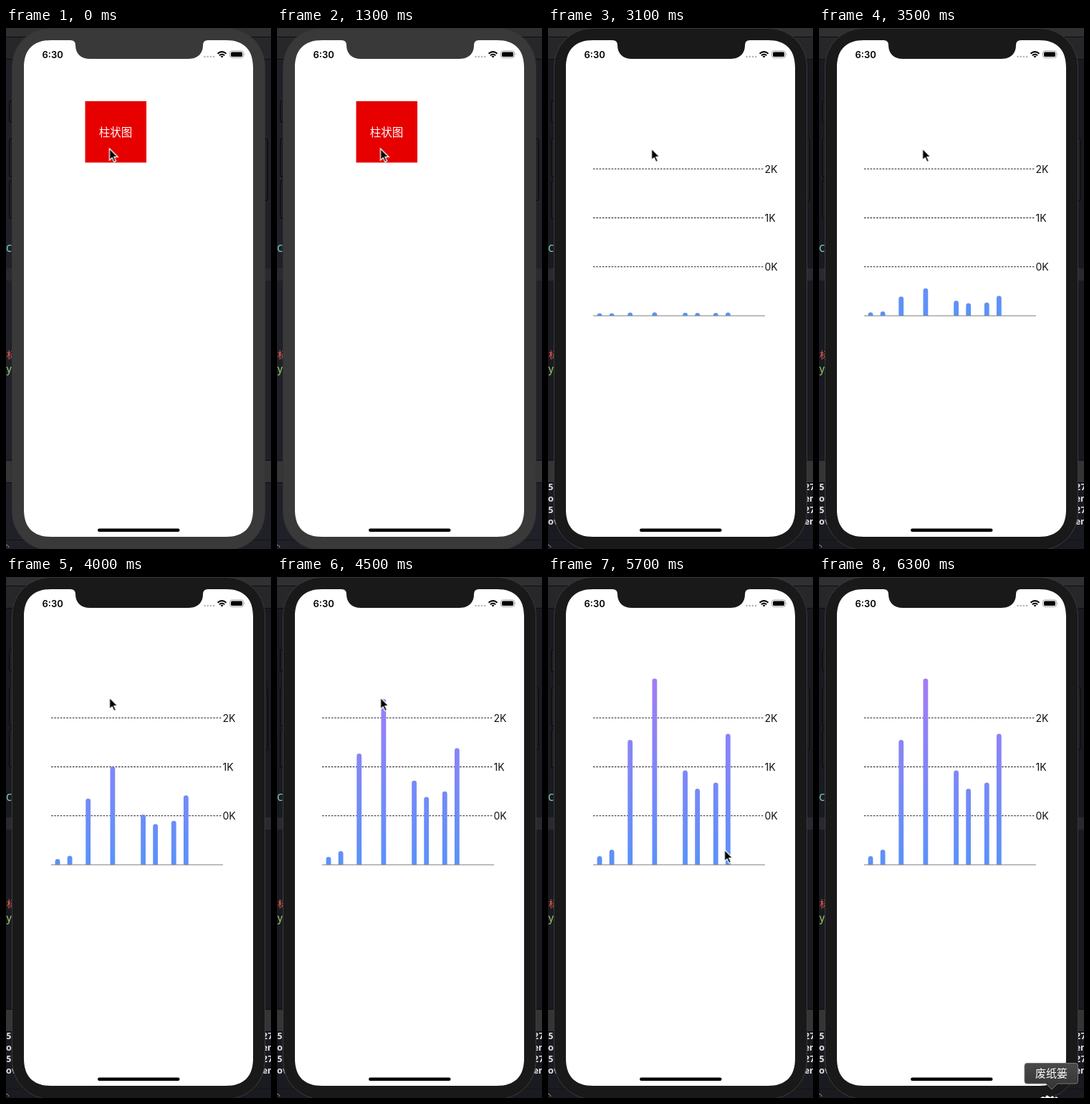
An HTML page that plays this animation: 370 by 726 pixels, repeating every 6.9 s.

```html
<!DOCTYPE html>
<html lang="zh">
<head>
<meta charset="utf-8">
<title>柱状图</title>
<style>
html, body { margin: 0; width: 100%; height: 100%; overflow: hidden; background: #1b1c22; }
svg { display: block; width: 370px; height: 726px; }
.ui { font-family: Inter, Roboto, sans-serif; }
.cjk { font-family: "Noto Sans CJK SC", "Noto Sans CJK", sans-serif; fill: #fff; }
.code { font: 14px "Noto Sans Mono", "DejaVu Sans Mono", monospace; }
.log { font: bold 13px "Noto Sans Mono", "DejaVu Sans Mono", monospace; fill: #e2e2e4; }
.label { font-size: 14px; fill: #111; }

/* one loop: press at 2900, chart at 3000, pointer leaves at 5400 */
.press, .menu, .chart, .ring, .editor, .body { animation: 6900ms step-end infinite; }
.editor { animation-name: editor; }
.body { animation-name: body; }
.ring { animation-name: ring; }
.menu { animation-name: menu; }
.chart { animation-name: chart; }
.bar { animation: grow 6900ms linear infinite; }
.pointer { animation: pointer 6900ms linear infinite; }
.tip { animation: tip 6900ms linear infinite; }

@keyframes editor { 0% { fill: #202128; } 42.02%, 100% { fill: #1a1b21; } }
@keyframes body {
  0% { fill: #393939; stroke: #343434; }
  42.02%, 100% { fill: #191919; stroke: #3b3b3b; }
}
@keyframes ring { 0% { opacity: 0; } 42.02% { opacity: 1; } 43.47%, 100% { opacity: 0; } }
@keyframes menu { 0% { opacity: 1; } 43.47%, 100% { opacity: 0; } }
@keyframes chart { 0% { opacity: 0; } 43.47%, 100% { opacity: 1; } }
@keyframes grow {
  0%, 43.47% { y: 397.5px; animation-timing-function: cubic-bezier(.42, 0, .58, 1); }
  71.83%, 100% { y: var(--top); }
}
@keyframes pointer {
  0%, 78.26% { transform: translate(144.5px, 168px); animation-timing-function: ease-in; }
  82.609% { transform: translate(246px, 378px); animation-timing-function: ease-out; }
  86.957%, 100% { transform: translate(322px, 732px); }
}
@keyframes tip {
  0%, 86.95% { opacity: 0; transform: translateY(30px); }
  86.957% { opacity: 1; transform: translateY(30px); animation-timing-function: ease-out; }
  90.5%, 100% { opacity: 1; transform: none; }
}
</style>
</head>
<body>
<svg viewBox="0 0 370 726">
  <defs>
    <linearGradient id="tint" gradientUnits="userSpaceOnUse" x1="0" y1="401" x2="0" y2="141">
      <stop offset="0" stop-color="#5a92f8"/>
      <stop offset="1" stop-color="#a47cf6"/>
    </linearGradient>
    <linearGradient id="panel" x2="0" y2="1">
      <stop offset="0" stop-color="#4a4a4a"/>
      <stop offset="1" stop-color="#333"/>
    </linearGradient>
    <clipPath id="plot"><rect x="60" y="100" width="250" height="301"/></clipPath>
  </defs>

  <!-- editor behind the phone -->
  <rect class="editor" width="370" height="726"/>
  <rect width="370" height="12" fill="#303032"/>
  <rect y="13" width="370" height="30" fill="#27272a"/>
  <path d="M0 12.5H370M0 43.5H370M0 602.5H370M0 633.5H370" stroke="#0e0e10"/>
  <rect y="335" width="370" height="17" fill="#292a31"/>
  <rect y="603" width="370" height="30" fill="#353537"/>
  <path d="M0 713.5H370" stroke="#131317"/>
  <path d="M-2 722Q2 718 4 724" fill="none" stroke="#999"/>
  <g class="code">
    <text x="0" y="312" fill="#83d6c5">C</text>
    <text x="1" y="460" fill="#ef5b55" style="font-family:'Noto Sans CJK SC','Noto Sans CJK',sans-serif;font-size:13px">标</text>
    <text x="0" y="480" fill="#a9dc76">y</text>
  </g>
  <g class="chart log" id="logs"></g>

  <!-- phone -->
  <g fill="#1d1d1f" stroke="#08080a">
    <rect x="4.5" y="101.5" width="8" height="30" rx="2"/>
    <rect x="4.5" y="154.5" width="8" height="53" rx="2"/>
    <rect x="4.5" y="212.5" width="8" height="53" rx="2"/>
    <rect x="357.5" y="154.5" width="8" height="86" rx="2"/>
  </g>
  <rect class="body" x="8.5" y=".5" width="353" height="727" rx="53"/>
  <path fill="#fff" d="M63 17H90Q97 17 97 24C97 36 105 43 117 43H255C267 43 275 36 275 24Q275 17 282 17H307C332 17 345 30 345 55V671C345 696 332 709 307 709H63C38 709 25 696 25 671V55C25 30 38 17 63 17Z"/>
  <rect x="128" y="697.5" width="114.500" height="4.500" rx="2.250"/>

  <g class="ui">
    <text x="50.500" y="41.500" font-size="13" font-weight="600">6:30</text>
    <path d="M277.500 40H292" stroke="#b5b5b5" stroke-width="2.600" stroke-linecap="round" stroke-dasharray="0 4.200"/>
    <g fill="none" stroke="#000" stroke-width="2">
      <path d="M295.500 35.700Q301.500 30.500 307.500 35.700M297.800 38.300Q301.500 35.200 305.200 38.300"/>
      <path d="M301.500 41.500L299.500 39.500Q301.500 38 303.500 39.500Z" fill="#000" stroke="none"/>
    </g>
    <rect x="312.500" y="32" width="19" height="9.500" rx="2.800" fill="none" stroke="#a2a2a2"/>
    <rect x="314" y="33.500" width="16" height="6.500" rx="1.500"/>
    <path d="M332.700 35Q334.500 36.700 332.700 38.500Z" fill="#a2a2a2"/>
  </g>

  <g class="menu">
    <rect x="110.500" y="102" width="85.500" height="85.500" fill="#e60000"/>
    <text class="cjk" x="129.700" y="150.500" font-size="15.500" font-weight="300">柱状图</text>
  </g>

  <g class="chart">
    <g class="ui" id="grid"></g>
    <g id="bars" clip-path="url(#plot)" fill="url(#tint)"></g>
    <path d="M63 401H303" stroke="#7d7d7d"/>
  </g>

  <g class="ring" fill="none">
    <circle cx="144.500" cy="169" r="23.300" stroke="#fff" stroke-width="3.600"/>
    <circle cx="144.500" cy="169" r="23.300" stroke="#000" stroke-width="1.800"/>
  </g>

  <path class="pointer" d="M0 0V16.200L3.700 12.800L6.300 18.700L9 17.500L6.500 11.700H11.600Z" stroke="#fff" stroke-width="1.300"/>

  <g class="tip">
    <path d="M290.500 677.500H358Q361.500 677.500 361.500 681V702.500Q361.500 706 358 706H333L325 714L317 706H290.500Q287 706 287 702.500V681Q287 677.500 290.500 677.500Z" fill="url(#panel)" stroke="#777"/>
    <text class="cjk" x="302" y="697" font-size="15">废纸篓</text>
    <path d="M309 726L312 724L316 725L318 722L323 725L326 723L329 726L331 724L334 726Z" fill="#fff"/>
  </g>
</svg>
<script>
const fill = (id, items, draw) =>
  document.getElementById(id).innerHTML = items.map(draw).join('');

fill('logs', [['5', '27'], ['ov', 'en'], ['5', '27'], ['ov', 'en']], ([left, right], i) => {
  const y = 643.5 + 16 * i;
  return `<text x="0" y="${y}">${left}</text><text x="357.5" y="${y}">${right}</text>`;
});

fill('grid', ['2K', '1K', '0K'], (label, i) => {
  const y = 196.3 + 68.2 * i;
  return `<path d="M63 ${y}H302" stroke="#4a4a4a" stroke-width="1.3" stroke-dasharray="2.56 1.71"/>
    <text class="label" x="302.500" y="${y + 5.2}">${label}</text>`;
});

// [slot, top edge when fully grown]
const bars = [[0, 389], [2, 380], [5, 227], [9, 141.5], [14, 269.5], [16, 295], [19, 286.5], [21, 218.5]];
fill('bars', bars, ([slot, top]) =>
  `<rect class="bar" x="${68.6 + 8.54 * slot}" width="6.8" height="300" rx="3.4" style="--top:${top}px"/>`);
</script>
</body>
</html>
```
